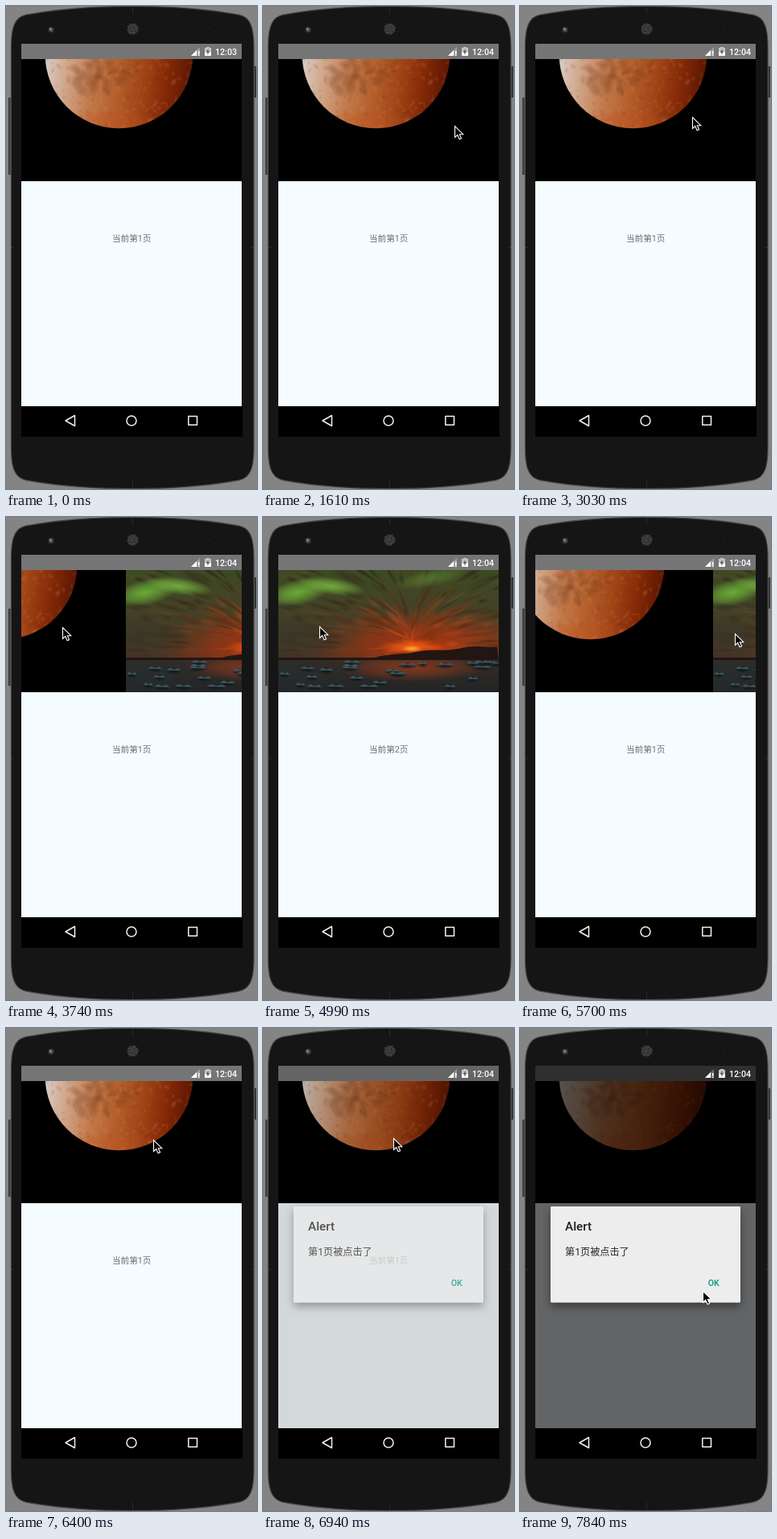
Animation, 312 px wide and 601 px high, one loop 8000 ms. Source, as an HTML page with a canvas:

```html
<!DOCTYPE html>
<html lang="zh-CN">
<head>
<meta charset="utf-8">
<title>Pager</title>
<style>
html, body { margin: 0; width: 100%; height: 100%; overflow: hidden; background: #848484; }
canvas { display: block; width: 312px; height: 601px; }
</style>
</head>
<body>
<canvas id="stage"></canvas>
<script>
const W = 312, H = 601, LOOP = 8000, STEPS = 45;
const SCREEN = { x: 19, y: 47, w: 274, bottom: 498 };
const PHOTO = { y: 66, w: 274, h: 152 };
const DP = SCREEN.w / 360;
const FONT = 'Roboto, "Noto Sans CJK SC", "Noto Sans CJK", sans-serif';
const dpr = window.devicePixelRatio || 1;

const clamp = (v, lo, hi) => Math.min(hi, Math.max(lo, v));
const mix = (a, b, p) => a + (b - a) * p;

function seeded(seed) {
  return () => {
    seed = (seed + 0x6D2B79F5) | 0;
    let t = Math.imul(seed ^ (seed >>> 15), 1 | seed);
    t = (t + Math.imul(t ^ (t >>> 7), 61 | t)) ^ t;
    return ((t ^ (t >>> 14)) >>> 0) / 4294967296;
  };
}

function surface(canvas, w, h) {
  canvas.width = Math.round(w * dpr);
  canvas.height = Math.round(h * dpr);
  const c = canvas.getContext('2d');
  c.scale(dpr, dpr);
  return c;
}

const stage = surface(document.getElementById('stage'), W, H);
let ctx = stage;

// ---- Motion ----

// Where the pointer turns: step, x, y
const STOPS = [
  [4, 304, 590], [9, 238, 149], [10, 247, 147], [13, 65, 146], [17, 214, 138],
  [21, 70, 137], [24, 1, 137], [28, 70, 136], [29, 78, 137], [32, 267, 145],
  [37, 162, 137], [39, 162, 137], [44, 227, 327]
];

function pointerAt(step) {
  const next = STOPS.findIndex(stop => stop[0] > step);
  const i = next < 0 ? STOPS.length - 1 : next;
  const a = STOPS[i - 1], b = STOPS[i];
  const p = (step - a[0]) / (b[0] - a[0]);
  return { x: Math.round(mix(a[1], b[1], p)), y: Math.round(mix(a[2], b[2], p)) };
}

// Distance left after a released page has glided for n steps
const settle = (distance, n) => distance * Math.max(0, 1 - n / 2.6) ** 2;

function scrollAt(step) {
  if (step < 17) return 0;
  if (step <= 24) return 214 - pointerAt(step).x;
  if (step < 29) return PHOTO.w - settle(61, step - 24);
  if (step <= 31) return PHOTO.w + 70 - pointerAt(step).x;
  return settle(140, step - 31);
}

// ---- Drawing helpers ----

function rect(x, y, w, h, color) {
  ctx.fillStyle = color;
  ctx.fillRect(x, y, w, h);
}

function poly(points, color) {
  ctx.beginPath();
  points.forEach(([x, y]) => ctx.lineTo(x, y));
  ctx.closePath();
  if (color) {
    ctx.fillStyle = color;
    ctx.fill();
  }
}

function disc(x, y, r, color) {
  ctx.beginPath();
  ctx.arc(x, y, r, 0, Math.PI * 2);
  ctx.fillStyle = color;
  ctx.fill();
}

function text(s, x, y, dp, color, weight = 400, align = 'left') {
  ctx.font = `${weight} ${dp * DP}px ${FONT}`;
  ctx.textAlign = align;
  ctx.fillStyle = color;
  ctx.fillText(s, x, y);
}

// Soft elliptical spot; rgb is "r,g,b"
function glow(x, y, rx, ry, rgb, alpha, turn = 0) {
  ctx.save();
  ctx.translate(x, y);
  ctx.rotate(turn);
  ctx.scale(rx, ry);
  const g = ctx.createRadialGradient(0, 0, 0, 0, 0, 1);
  g.addColorStop(0, `rgba(${rgb},${alpha})`);
  g.addColorStop(0.5, `rgba(${rgb},${alpha * 0.6})`);
  g.addColorStop(1, `rgba(${rgb},0)`);
  disc(0, 0, 1, g);
  ctx.restore();
}

function gradient(x0, y0, x1, y1, ...colors) {
  const g = ctx.createLinearGradient(x0, y0, x1, y1);
  colors.forEach((color, i) => g.addColorStop(i / (colors.length - 1), color));
  return g;
}

// ---- Photos ----

function photo(paint) {
  const canvas = document.createElement('canvas');
  ctx = surface(canvas, PHOTO.w, PHOTO.h);
  paint(PHOTO.w, PHOTO.h, seeded(7));
  ctx = stage;
  return canvas;
}

function paintMoon(w, h, rand) {
  const cx = 121.5, cy = -5.5, r = 91.8;
  rect(0, 0, w, h, '#000');
  ctx.beginPath();
  ctx.arc(cx, cy, r, 0, Math.PI * 2);
  ctx.clip();
  rect(0, 0, w, h, gradient(30, 0, 214, 24,
    '#d8cdc6', '#cfa284', '#c2794a', '#b45f2b', '#a04416', '#832806', '#571402'));
  glow(112, 78, 60, 18, '190,84,34', 0.5);
  // Dark plains, then fine surface grain
  for (let i = 0; i < 16; i++) {
    const a = i * 2.4, d = Math.sqrt(i / 16);
    glow(96 + Math.cos(a) * d * 38, 22 + Math.sin(a) * d * 22, mix(8, 16, rand()), mix(5, 10, rand()),
      '108,54,26', 0.34, a);
  }
  for (let i = 0; i < 240; i++) {
    const tone = rand() < 0.5 ? '95,35,10' : '235,150,95';
    glow(cx + mix(-r, r, rand()), rand() * 88, mix(1, 6, rand()), mix(1, 4, rand()), tone, 0.16, rand() * 3);
  }
}

function paintAurora(w, h, rand) {
  const sun = { x: 166, y: 95 }, shore = 111;
  rect(0, 0, w, h, gradient(0, 0, 0, shore, '#3c4a22', '#454028', '#4c3324'));
  glow(sun.x + 20, sun.y, 150, 48, '190,52,12', 0.85);

  // Clouds fan out from the sun: hot nearby, olive far away
  for (let i = 0; i < 260; i++) {
    const x = rand() * w, y = rand() * shore;
    const dx = x - sun.x, dy = y - sun.y;
    const heat = clamp(1.05 - Math.hypot(dx / 150, dy / 78), 0, 1);
    const light = mix(0.45, 1.1, rand());
    const rgb = [mix(72, 228, heat), mix(70, 72, heat), mix(40, 16, heat)].map(v => Math.round(v * light));
    glow(x, y, mix(7, 26, rand()), mix(1.5, 4.5, rand()), rgb.join(), 0.6, Math.atan(dy * 0.5 / (dx || 1)));
  }
  glow(24, 28, 42, 16, '112,190,58', 0.85, -0.2);
  glow(66, 20, 42, 11, '122,188,66', 0.85, 0.15);
  glow(190, 10, 48, 11, '92,135,50', 0.65, -0.2);
  glow(20, 82, 90, 30, '54,54,40', 0.75);
  glow(sun.x, sun.y, 42, 9, '255,98,16', 0.9);
  glow(sun.x, sun.y + 3, 13, 4, '255,180,60', 0.9);

  rect(0, shore, w, h - shore, gradient(0, shore, 0, h, '#352b26', '#2c2826', '#222426'));
  glow(sun.x, shore + 10, 95, 18, '165,62,26', 0.7);
  glow(10, shore + 20, 85, 30, '36,46,46', 0.8);

  const ridge = [[0, shore + 1]];
  for (let x = 0; x <= w; x += 4) {
    const rise = clamp((x - 120) / 154, 0, 1) ** 0.7;
    ridge.push([x, shore - 2 - rise * 15 - Math.sin(x / 9) * 1.5 * rise]);
  }
  poly([...ridge, [w, shore + 1]], '#221512');

  // Ice: wider pieces toward the viewer
  for (let i = 0; i < 26; i++) {
    const near = rand(), x = rand() * w, y = shore + 3 + near * 34;
    const size = mix(5, 13, rand());
    glow(x, y + 2, size * 1.2, 4, '14,24,28', 0.95);
    poly([[x - size, y + 1], [x - size * 0.5, y - 2], [x, y], [x + size * 0.6, y - 1.5], [x + size, y + 1.5]],
      '#3d565c');
  }
}

const pages = [photo(paintMoon), photo(paintAurora)];

// ---- Scene ----

function body() {
  // One quarter of the outline, mirrored about the centre
  const quarter = (sx, sy) => {
    const px = x => 157.25 + sx * x, py = y => 300.5 + sy * y;
    ctx.lineTo(px(150.25), py(248));
    ctx.bezierCurveTo(px(150.25), py(272), px(147), py(286), px(132), py(289));
    ctx.bezierCurveTo(px(92), py(296.5), px(47), py(299.5), px(0), py(299.5));
  };
  const half = new Path2D();
  ctx.save();
  for (const sx of [-1, 1]) {
    for (const sy of [-1, 1]) {
      ctx.beginPath();
      ctx.moveTo(157.25 + sx * 150.25, 300.5);
      quarter(sx, sy);
      ctx.strokeStyle = '#474747';
      ctx.lineWidth = 2.4;
      ctx.stroke();
      ctx.lineTo(157.25, 300.5);
      ctx.fillStyle = '#151515';
      ctx.fill();
    }
  }
  ctx.restore();
  rect(150, 10, 15, 580, '#151515');
  rect(10, 298, 295, 5, '#151515');
}

function phone() {
  rect(0, 0, W, H, '#848484');
  const button = (x, y, h) => rect(x, y, 4.5, h, gradient(x, 0, x + 4.5, 0, '#2a2a2a', '#555', '#1c1c1c'));
  button(3, 114, 96);
  button(306.5, 75, 39);
  body();
  disc(56, 29.5, 4, '#2b2b30');
  disc(56, 29.5, 2.4, '#55566c');
  disc(55.2, 28.6, 1.1, '#a0a0b4');
  disc(253, 28, 1, '#242424');
  for (let i = 0; i < 70; i++) {
    const a = i * 2.4, r = Math.sqrt(i / 70) * 7;
    disc(157.5 + Math.cos(a) * r, 28.5 + Math.sin(a) * r, 0.5, '#808080');
  }
}

function pager(scroll) {
  ctx.save();
  ctx.beginPath();
  ctx.rect(SCREEN.x, PHOTO.y, PHOTO.w, PHOTO.h);
  ctx.clip();
  pages.forEach((page, i) =>
    ctx.drawImage(page, SCREEN.x + i * PHOTO.w - Math.round(scroll), PHOTO.y, PHOTO.w, PHOTO.h));
  ctx.restore();
}

function statusIcons(time) {
  poly([[230, 62], [241, 62], [241, 51]], 'rgba(255,255,255,.3)');
  poly([[230, 62], [237, 62], [237, 55]], '#fff');
  rect(239, 56, 1.5, 4, '#fff');
  rect(239, 60.7, 1.5, 1.5, '#fff');
  rect(249, 51, 4, 1.5, '#c4c4c4');
  rect(247, 52, 8, 5, '#c4c4c4');
  rect(247, 57, 8, 5, '#fff');
  poly([[251.6, 53], [248.6, 57.7], [250.6, 57.7], [250.2, 61], [253.3, 56.3], [251.3, 56.3]], '#555');
  text(time, 260, 61, 14, '#fff', 500);
}

function navBar() {
  rect(SCREEN.x, SCREEN.bottom, 275, 38, '#000');
  ctx.strokeStyle = '#f2f2f2';
  ctx.lineWidth = 1.5;
  ctx.lineJoin = 'round';
  poly([[74, 516], [85.5, 509.5], [85.5, 522.5]]);
  ctx.stroke();
  ctx.beginPath();
  ctx.arc(156, 516, 6, 0, Math.PI * 2);
  ctx.stroke();
  ctx.strokeRect(226.8, 510.5, 10.7, 10.7);
}

function alertBox(alpha) {
  const box = new Path2D();
  box.roundRect(38, 222, 236, 119.5, 1.5);
  const outside = new Path2D(box);
  outside.rect(0, 0, W, H);
  ctx.save();
  ctx.globalAlpha = alpha;
  ctx.fillStyle = '#ededed';
  // Keep the shadow from showing through the half-faded box
  ctx.save();
  ctx.clip(outside, 'evenodd');
  ctx.shadowColor = 'rgba(0,0,0,.42)';
  ctx.shadowBlur = 11 * dpr;
  ctx.shadowOffsetY = 5 * dpr;
  ctx.fill(box);
  ctx.restore();
  ctx.fill(box);
  text('Alert', 56, 252, 20, '#202020', 500);
  text('第1页被点击了', 56, 283, 16, '#242424');
  text('OK', 233.7, 321, 14, '#009688', 500);
  ctx.restore();
}

function pointer({ x, y }) {
  ctx.save();
  ctx.translate(x + 0.5, y + 0.5);
  poly([[0, 0], [0, 14], [3.2, 11], [5.6, 16.3], [8.1, 15.2], [5.8, 10.2], [10.3, 10.2]], '#000');
  ctx.strokeStyle = '#fff';
  ctx.lineWidth = 1.1;
  ctx.lineJoin = 'miter';
  ctx.stroke();
  ctx.restore();
}

function draw(step) {
  const page = step >= 25 && step < 32 ? 2 : 1;
  const fade = clamp((step - 38) / 1.33, 0, 1);
  const dim = fade < 1 ? fade * 0.19 : 0.6;
  phone();
  rect(SCREEN.x, SCREEN.y, SCREEN.w, SCREEN.bottom - SCREEN.y, '#f5fcff');
  rect(SCREEN.x, SCREEN.y, SCREEN.w, PHOTO.y - SCREEN.y, '#757575');
  pager(scrollAt(step));
  text(`当前第${page}页`, 156.2, 293, 14, '#6c6e70', 400, 'center');
  rect(SCREEN.x, SCREEN.y, SCREEN.w, SCREEN.bottom - SCREEN.y, `rgba(0,0,0,${dim})`);
  statusIcons(step < 7 ? '12:03' : '12:04');
  navBar();
  if (fade > 0) alertBox(fade);
  if (step >= STOPS[0][0]) pointer(pointerAt(step));
}

let start = null, last = -1;
function tick(now) {
  if (start === null) start = now;
  const step = Math.floor(((now - start) % LOOP) * STEPS / LOOP);
  if (step !== last) draw(last = step);
  requestAnimationFrame(tick);
}
draw(0);
requestAnimationFrame(tick);
</script>
</body>
</html>
```
